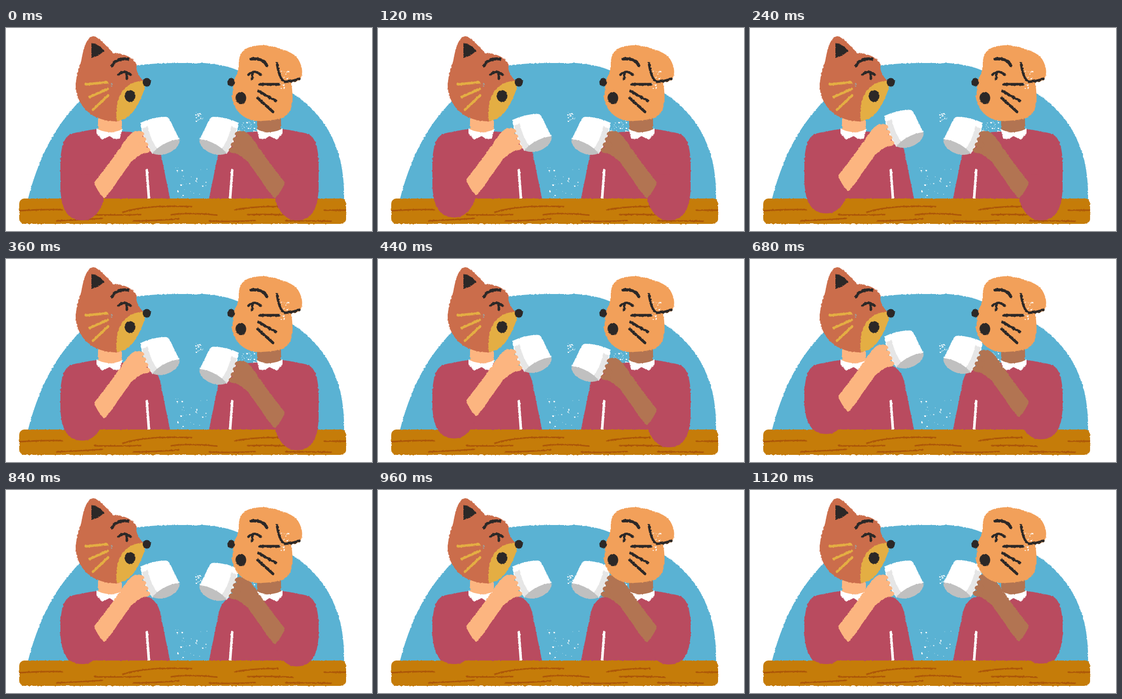
Animation, 720 px wide and 400 px high, one loop 1680 ms. Source, as an HTML page:

```html
<!DOCTYPE html>
<html lang="en">
<head>
<meta charset="utf-8">
<title>Cheers</title>
<style>
  html, body { margin: 0; width: 100%; height: 100%; overflow: hidden; background: #fff; }
  svg { display: block; width: 100%; height: 100%; }
</style>
</head>
<body>
<svg id="stage" viewBox="0 0 720 400"></svg>
<script>
const LOOP = 1680, STEP = 40;
const BLUE = '#5ab2d3', RED = '#b94b5f', BLACK = '#2c2827', WOOD = '#c57c09', GRAIN = '#ac5608';
const GOLD = '#e4ae43', FOX = '#cb6d4b', DOG = '#f2a05a';
const LIGHT_SKIN = '#fcb580', DARK_SKIN = '#b27452';

const shape = (fill, d) => `<path fill="${fill}" d="${d}"/>`;
const line = (color, width, d) =>
  `<path fill="none" stroke="${color}" stroke-width="${width}" stroke-linecap="round" ` +
  `stroke-linejoin="round" d="${d}"/>`;
const oval = (fill, x, y, rx, ry = rx) =>
  `<ellipse fill="${fill}" cx="${x}" cy="${y}" rx="${rx}" ry="${ry}"/>`;
const rough = content => `<g filter="url(#rough)">${content}</g>`;
const mirror = content => `<g transform="matrix(-1 0 0 1 722 0)">${content}</g>`;
const repeat = (count, draw) => Array.from({ length: count }, (_, i) => draw(i)).join('');

let seed = 7;
const random = () => (seed = seed * 16807 % 2147483647) / 2147483647;
const between = (low, high) => low + (high - low) * random();

function specks(color, count, x, y, w, h) {
  return shape(color, repeat(count, () => {
    const size = between(0.6, 1) + 2 * random() ** 3;
    return `M${between(x, x + w)},${between(y, y + h)}h${size * 1.3}v${size}h${-size}z`;
  }));
}

const dome = shape(BLUE, `M43,338 C70,230 130,120 255,74 Q290,69 340,69 H390 Q430,72 455,83
  C600,120 668,205 665,338Z`);

const wear = specks('#fff', 22, 371, 164, 17, 23) + specks('#fff', 30, 456, 181, 34, 23) +
  specks('#fff', 22, 333, 275, 62, 36) + specks('#fff', 8, 326, 318, 62, 16);

// Each grain line is a gentle wave that rises or falls along the board.
const table = `<rect fill="${WOOD}" x="26" y="336" width="643" height="50" rx="10"/>` +
  line(GRAIN, 3, 'M27,360 Q70,357 112,358 M230,363 Q275,348 365,352') +
  repeat(7, i => {
    const x = 100 + 75 * i, y = i % 2 ? 368 : 380;
    return line(GRAIN, 2.8, `M${x},${y} q35,${between(-9, 3)} 90,${between(-5, 3)}`);
  }) +
  line(GRAIN, 2.8, 'M450,358 Q490,351 535,352 M626,359 H668');

const torso = skin =>
  shape(RED, `M178,199 Q150,203 130,208 Q107,215 107,270 V285 Q110,320 125,338 H323
    L303,240 Q298,222 285,213 Q262,205 229,204Z`) +
  shape(skin, 'M181,175 H228 V205 H181Z') +
  shape('#fff', 'M178,198 Q204,212 229,199 L224,218 L213,219 L204,213 L189,220 L178,207Z') +
  line('#fff', 5, 'M277,280 L281,334');

const mug =
  shape('#fff', 'M264,187 Q290,175 314,175 Q320,175 322,181 L341,219 L288,248 Q270,225 264,187Z') +
  shape('#e6e6e6', 'M268,198 L279,194 Q284,220 299,240 L288,248 L272,215Z') +
  shape('#c0c0c0', 'M341,219 C345,231 325,249 305,250 Q294,250 288,247 C300,232 322,221 341,219Z');

const arm = skin =>
  shape(RED, 'M107,285 V315 C108,355 120,379 150,379 C178,379 190,350 193,334 L185,290Z') +
  mug +
  shape(skin, `M173,305 L209,258 L240,214 Q256,196 264,208 L277,244 Q258,252 246,264
    L221,299 Q207,322 193,336 Q180,322 173,305Z`) +
  repeat(4, i => oval(skin, 262 + 4 * i, 209 + 10.5 * i, 10, 6));

const gaze = line(BLACK, 6, 'M209,74 Q216,59 240,61') +
  line(BLACK, 5, 'M221,92 Q233,81 245,92 M237,88 L238,100');

const fox =
  shape(FOX, `M172,16 Q182,17 211,50 Q245,50 257,72 Q254,88 270,104 C272,135 245,178 218,184
    C165,184 137,150 137,110 Q140,85 148,65 C155,25 163,18 172,16Z`) +
  shape(GOLD, 'M268,104 Q277,112 270,127 Q250,182 218,183 C213,140 228,108 268,104Z') +
  shape(BLACK, 'M168,31 Q176,27 194,45 Q182,56 168,59Z') +
  oval(BLACK, 277, 107, 8, 8.5) + oval(BLACK, 244, 134, 10.5, 11.5) + gaze +
  repeat(3, i => line(GOLD, 5, `M${157 + 7 * i},${111 + 25 * i} l${42 - 6 * i},${-4 - 12 * i}`)) +
  specks('#9aa5a5', 7, 199, 108, 10, 6);

const dog =
  shape(DOG, `M458,75 C456,40 480,33 510,34 C535,38 560,46 572,57 C584,75 586,92 577,103
    Q568,107 561,106 C566,140 566,165 545,177 Q520,184 490,183 C460,178 447,155 444,135
    Q449,115 446,105 Q456,92 458,75Z`) +
  oval(BLACK, 443, 107, 7.5, 8.5) + oval(BLACK, 462, 138, 10.5, 12) + mirror(gaze) +
  line(BLACK, 5, 'M533,69 Q538,103 549,106 Q563,105 577,100') +
  repeat(3, i => line(BLACK, 5.5,
    `M${499 - 2 * i},${111 + 13.5 * i} l${38 - 4 * i},${27 * Math.sin(i * Math.PI / 4)}`)) +
  specks('#fff', 16, 539, 84, 16, 15) + specks('#fff', 8, 538, 108, 9, 12);

document.getElementById('stage').innerHTML =
  `<filter id="rough" filterUnits="userSpaceOnUse" x="0" y="0" width="722" height="400"
     color-interpolation-filters="sRGB">
     <feTurbulence type="fractalNoise" baseFrequency="0.25" numOctaves="2" seed="4"/>
     <feDisplacementMap in="SourceGraphic" scale="3" xChannelSelector="R" yChannelSelector="G"/>
   </filter>` +
  rough(dome) + wear +
  rough(torso(LIGHT_SKIN)) + mirror(rough(torso(DARK_SKIN))) +
  rough(table) +
  `<g id="leftArm">${rough(arm(LIGHT_SKIN))}</g>` +
  `<g id="rightArm">${mirror(rough(arm(DARK_SKIN)))}</g>` +
  rough(fox) + rough(dog);

const leftArm = document.getElementById('leftArm');
const rightArm = document.getElementById('rightArm');

function raise(arm, time, start, duration, height) {
  const p = Math.max(0, Math.min(1, (time - start) / duration));
  arm.setAttribute('transform', `translate(0 ${-height * Math.sin(p * Math.PI / 2)})`);
}

function draw(now) {
  const time = Math.floor(now % LOOP / STEP) * STEP;
  raise(leftArm, time, 40, 800, 36);
  raise(rightArm, time, 330, 790, 37);
}

let origin;
function tick(now) {
  origin ??= now;
  draw(now - origin);
  requestAnimationFrame(tick);
}
draw(0);
requestAnimationFrame(tick);
</script>
</body>
</html>
```
